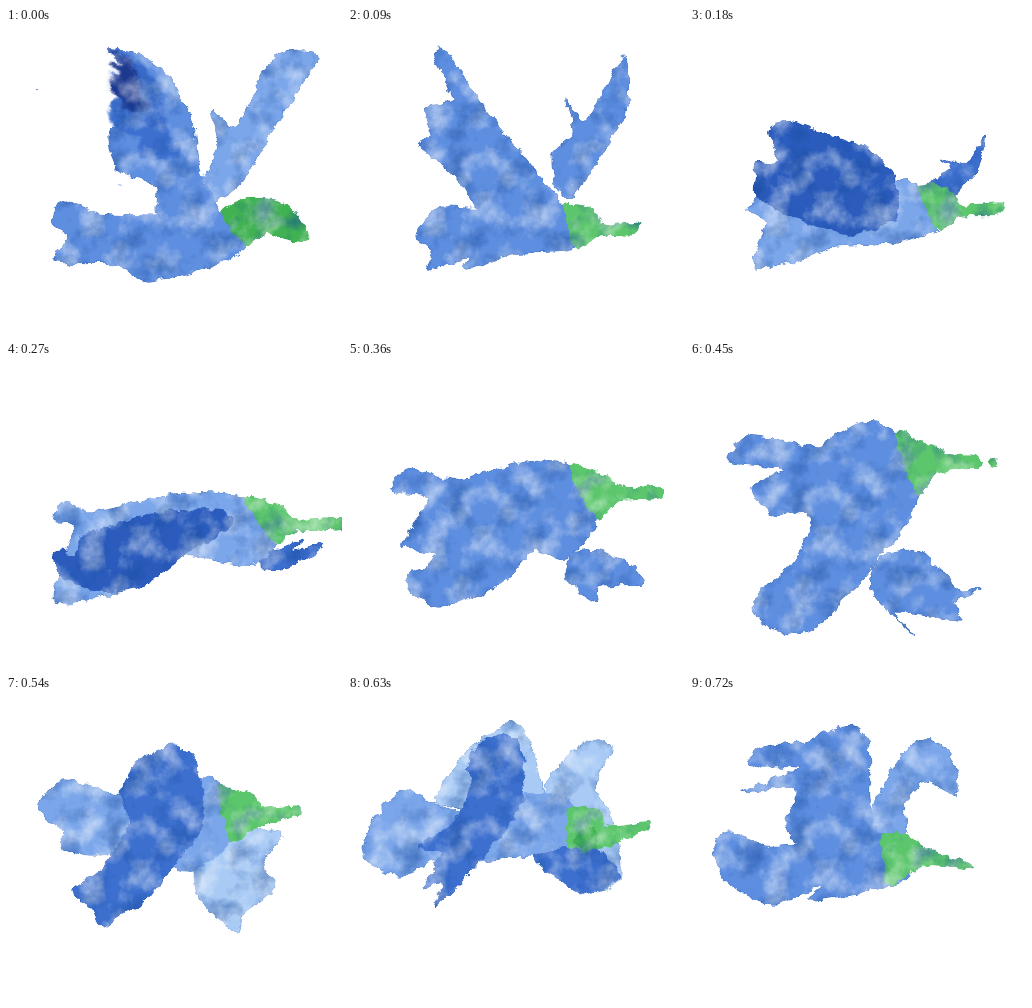
An HTML page for the animation above (810 ms loop, 336 by 306 pixels).

```html
<!DOCTYPE html>
<html lang="en">
<head>
<meta charset="utf-8">
<title>Watercolour bird</title>
<style>
  html, body { margin: 0; width: 100%; height: 100%; overflow: hidden; background: #fff; }
  svg { display: block; width: 336px; height: 306px; }
  .edge { stroke-width: 1.6; stroke-linejoin: round; }
  .wash { filter: blur(1.5px); }
</style>
</head>
<body>
<svg id="stage" viewBox="0 0 336 306">
  <filter id="paint" filterUnits="userSpaceOnUse" x="0" y="0" width="336" height="306" color-interpolation-filters="sRGB">
    <feTurbulence type="fractalNoise" baseFrequency=".1" numOctaves="3" seed="4" result="grain"/>
    <feDisplacementMap in="SourceGraphic" in2="grain" scale="9" xChannelSelector="R" yChannelSelector="G" result="shape"/>
    <feTurbulence type="fractalNoise" baseFrequency=".04" numOctaves="5" seed="9" result="cloud"/>
    <feColorMatrix in="cloud" values="0 0 0 0 1  0 0 0 0 1  0 0 0 0 1  1.3 0 0 0 -.58" result="pale"/>
    <feColorMatrix in="cloud" values="0 0 0 0 .08  0 0 0 0 .28  0 0 0 0 .6  0 1.2 0 0 -.56" result="deep"/>
    <feMerge result="pigment">
      <feMergeNode in="shape"/><feMergeNode in="pale"/><feMergeNode in="deep"/>
    </feMerge>
    <feComposite in="pigment" in2="shape" operator="in"/>
  </filter>
</svg>
<script>
const STEP = 90;
const SVG = "http://www.w3.org/2000/svg";

const BLUE = "#5e8edf", LIGHT = "#7ba6ea", PALE = "#a8caf5";
const MID = "#3c6fce", DARK = "#2b5cbd", NAVY = "#1d388f";
const GREEN = "#5cc66c", LEAF = "#40b252";

const points = text => text.split(" ").map(pair => pair.split(",").map(Number));
const mix = (a, b, t) => a.map((p, i) => p.map((v, k) => v + (b[i][k] - v) * t));
const shrink = (shape, size, anchor) => mix(shape, shape.map(() => anchor), 1 - size);
const dot = (x, y, r) => [[x - r, y], [x, y - r], [x + r, y], [x, y + r]];

// Wings run from the root round the tip and back; body and head start at the nape.
function bird(wing, far, body, head, style = {}) {
  const colors = { wing: BLUE, far: BLUE, body: BLUE, head: GREEN, back: [], front: [], washes: [], ...style };
  return { wing: points(wing), far: points(far), body: points(body), head: points(head), ...colors };
}

// The pose halfway between two others.
function between(a, b) {
  const pose = { colors: a };
  for (const part of ["wing", "far", "body", "head"]) pose[part] = mix(a.shapes[part], b.shapes[part], .5);
  return pose;
}

function pose(wing, far, body, head, colors = {}) {
  return {
    shapes: { wing: points(wing), far: points(far), body: points(body), head: points(head) },
    colors: { wing: BLUE, far: BLUE, body: BLUE, head: GREEN, washes: [], back: [], front: [], ...colors }
  };
}

function halfway(a, b) {
  const shapes = {};
  for (const part in a.shapes) shapes[part] = mix(a.shapes[part], b.shapes[part], .5);
  return { shapes, colors: { ...b.colors, back: [], front: [] } };
}

const raised = pose(
  "212,185 195,145 187,95 165,52 135,28 101,22 143,57 104,58 132,86 103,103 110,140 150,158 152,187",
  "208,173 197,155 212,118 206,83 230,98 268,30 312,28 275,88 235,155",
  "215,185 150,187 95,185 55,172 46,195 62,208 48,234 110,236 140,253 200,240 240,218",
  "215,185 240,170 280,175 304,207 285,214 262,205 240,218",
  { far: LIGHT, head: LEAF, washes: [[MID, .65], [NAVY, .36]],
    front: [[MID, dot(30, 62, 1.5)], [LIGHT, dot(116, 157, 1)]] });

const spread = pose(
  "222,195 185,140 150,98 125,62 97,22 85,28 104,72 76,80 84,106 71,118 110,150 128,180 150,215",
  "222,170 207,158 204,127 226,105 219,72 238,92 276,28 278,82 245,140",
  "219,180 170,165 128,180 90,180 68,208 85,222 80,241 120,229 118,241 165,226 226,220",
  "217,178 245,180 255,195 291,193 285,207 250,208 228,222");

const folded = pose(
  "190,187 225,165 215,148 150,150 104,165 75,175 68,195 57,188 47,194 60,218 100,230 140,222 170,200",
  "255,205 257,190 272,188 297,178 285,190 314,182 316,186 298,197 275,207",
  "238,136 170,132 85,150 60,139 48,158 68,165 48,238 110,230 175,195 240,203 268,181",
  "238,136 275,143 290,157 335,156 335,168 290,170 268,181",
  { wing: DARK, far: MID, body: LIGHT });

const lowered = pose(
  "222,150 205,72 174,60 130,85 110,130 122,165 95,210 62,238 80,266 118,270 150,240 178,212 190,190",
  "182,230 190,195 230,190 270,228 291,225 264,242 272,258 205,250 222,272",
  "205,70 174,70 130,85 60,74 40,100 95,106 62,125 85,153 125,150 190,190 228,133",
  "205,70 240,83 258,92 288,93 288,105 250,110 228,133",
  { front: [[LEAF, dot(303, 101, 6)]] });

const gathered = pose(
  "172,110 176,60 160,38 135,45 120,65 122,92 102,130 70,150 92,158 76,192 96,185 88,210 145,150",
  "200,165 195,95 225,55 252,42 263,55 247,90 265,125 273,180 235,198",
  "222,103 165,98 105,115 58,94 25,125 17,162 52,180 85,165 130,165 180,160 222,156",
  "220,114 252,113 260,130 300,126 300,133 255,152 222,156",
  { wing: MID, far: PALE, body: LIGHT,
    back: [[PALE, points("90,108 120,55 165,25 186,60 188,105")]],
    front: [[MID, points("183,160 245,152 272,180 235,198")], [LEAF, dot(239, 144, 13)]] });

const lifted = pose(
  "190,160 180,105 178,45 155,29 115,45 70,52 60,70 110,72 50,97 105,92 96,128 110,152 130,165",
  "178,137 190,97 215,55 240,43 262,62 267,98 235,85 215,108 214,138",
  "195,137 150,145 75,150 40,135 24,150 36,185 83,208 135,188 120,205 190,193 220,178",
  "192,138 225,142 236,153 280,167 280,173 232,171 200,189",
  { far: LIGHT });

const cycle = [
  raised, spread, halfway(spread, folded), folded, halfway(folded, lowered),
  lowered, halfway(lowered, gathered), gathered, lifted
];

// Closed Catmull-Rom curve, slightly tightened.
function outline(shape) {
  const at = i => shape[(i + shape.length) % shape.length];
  const handle = (p, a, b, sign) => p.map((v, k) => v + sign * (b[k] - a[k]) / 8);
  const curves = shape.map((p, i) => {
    const next = at(i + 1);
    return `C${handle(p, at(i - 1), next, 1)} ${handle(next, p, at(i + 2), -1)} ${next}`;
  });
  return `M${shape[0]}${curves.join("")}Z`;
}

function addPath(group, color, shape, kind) {
  const path = document.createElementNS(SVG, "path");
  path.setAttribute("d", outline(shape));
  path.setAttribute("fill", color);
  path.setAttribute("class", kind);
  if (kind === "edge") path.setAttribute("stroke", `color-mix(in srgb, ${color} 75%, #123c90)`);
  group.append(path);
}

function paintPose({ shapes, colors }) {
  const group = document.createElementNS(SVG, "g");
  group.setAttribute("filter", "url(#paint)");
  const layers = [
    ...colors.back,
    ...["far", "body", "wing"].map(part => [colors[part], shapes[part]])
  ];
  const head = [colors.head, shapes.head];
  // All edges go down first, so that overlapping parts join without a seam.
  for (const [color, shape] of layers) addPath(group, color, shape, "edge");
  for (const [color, shape] of layers) addPath(group, color, shape, "fill");
  for (const [color, size] of colors.washes) {
    addPath(group, color, shrink(shapes.wing, size, shapes.wing[5]), "wash");
  }
  addPath(group, ...head, "fill");
  for (const [color, shape] of colors.front) addPath(group, color, shape, "fill");
  document.getElementById("stage").append(group);
  return group;
}

const frames = cycle.map(paintPose);
const start = performance.now();

function draw() {
  const current = Math.floor((performance.now() - start) / STEP) % frames.length;
  frames.forEach((frame, i) => frame.style.display = i === current ? "" : "none");
  requestAnimationFrame(draw);
}
draw();
</script>
</body>
</html>
```
